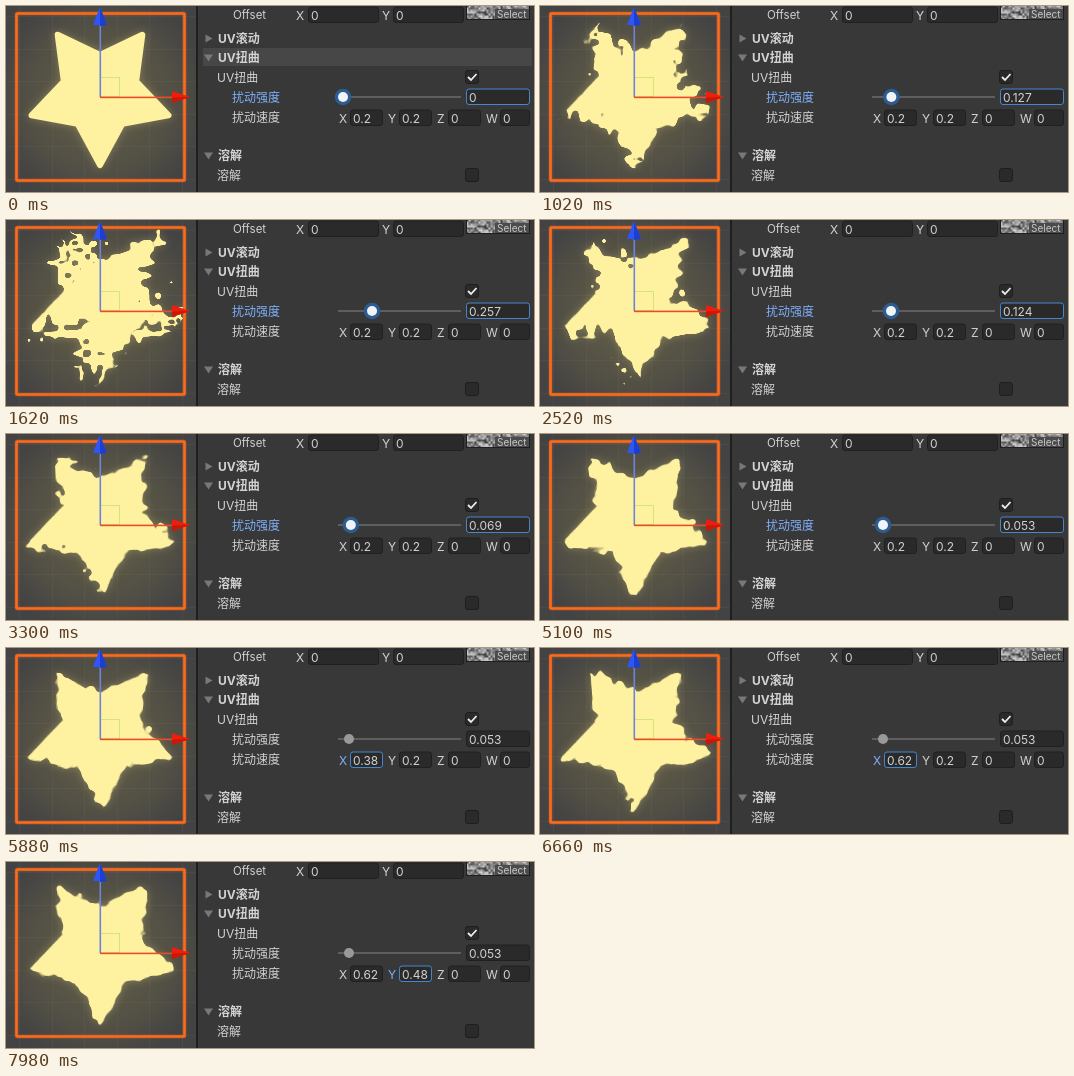
An HTML page with a canvas that plays this animation: 528x186 px, repeating every 8000 ms.

```html
<!DOCTYPE html>
<html lang="zh">
<head>
<meta charset="utf-8">
<style>
html, body { margin: 0; width: 100%; height: 100%; overflow: hidden; background: #383838; }
canvas { display: block; }
</style>
</head>
<body>
<canvas id="stage" width="528" height="186"></canvas>
<script>
const ctx = document.getElementById('stage').getContext('2d');
const LOOP = 8000, STEP = 60;
const SIZE = 166, LEFT = 11, TOP = 8;          // the textured quad
const FONT = 'Inter, "Noto Sans CJK SC", "Noto Sans CJK", sans-serif';
const TEXT = '#d2d2d2', BLUE = '#7fb0fb';

// Keyframes: [time, value, time, value, ...]
const STRENGTH = [540, 0, 900, .09, 1320, .22, 1560, .257, 1860, .257, 2220, .18, 2460, .124, 2580, .124, 3060, .085, 3540, .053];
const SPEED_X = [5580, .2, 6300, .62];
const SPEED_Y = [7260, .2, 7860, .48];

function track(keys, t) {
  if (t <= keys[0]) return keys[1];
  for (let i = 2; i < keys.length; i += 2) {
    if (t <= keys[i]) {
      const k = (t - keys[i - 2]) / (keys[i] - keys[i - 2]);
      return keys[i - 1] + (keys[i + 1] - keys[i - 1]) * k;
    }
  }
  return keys[keys.length - 1];
}

// Distance scrolled by the noise up to time t
function travel(keys, t) {
  let sum = 0;
  for (let s = 0; s < t; s += STEP) sum += track(keys, s) * STEP / 1000;
  return sum * SIZE;
}

let seed = 7;
const random = () => (seed = seed * 16807 % 2147483647) / 2147483647;
const lattice = Array.from({ length: 1024 }, random);

function valueNoise(x, y) {
  const ix = Math.floor(x), iy = Math.floor(y);
  let u = x - ix, v = y - iy;
  u *= u * (3 - 2 * u);
  v *= v * (3 - 2 * v);
  const at = (a, b) => lattice[(a & 31) + (b & 31) * 32];
  const a = at(ix, iy), b = at(ix + 1, iy), c = at(ix, iy + 1), d = at(ix + 1, iy + 1);
  return a + (b - a) * u + (c - a + (a - b - c + d) * u) * v;
}
const noise = (x, y) => .7 * valueNoise(x / 6.5, y / 6.5) + .3 * valueNoise(x / 13 + 9, y / 13 + 4);

function layer(w, h) {
  const c = document.createElement('canvas');
  c.width = w;
  c.height = h;
  return c.getContext('2d');
}

const star = layer(SIZE, SIZE);
star.beginPath();
for (let i = 0; i < 10; i++) {
  const r = i % 2 ? 38 : 72, a = Math.PI / 2 + i * Math.PI / 5;
  star.lineTo(94 - LEFT + r * Math.cos(a), 87 - TOP + r * Math.sin(a));
}
star.closePath();
star.lineWidth = 6;
star.lineJoin = 'round';
star.fill();
star.stroke();
const mask = star.getImageData(0, 0, SIZE, SIZE).data;
const warped = layer(SIZE, SIZE);
const pixels = warped.createImageData(SIZE, SIZE);

const alpha = (x, y) => x < 0 || y < 0 || x >= SIZE || y >= SIZE ? 0 : mask[(x + y * SIZE) * 4 + 3];

function sample(x, y) {
  const ix = Math.floor(x), iy = Math.floor(y), u = x - ix, v = y - iy;
  return (alpha(ix, iy) * (1 - u) + alpha(ix + 1, iy) * u) * (1 - v)
    + (alpha(ix, iy + 1) * (1 - u) + alpha(ix + 1, iy + 1) * u) * v;
}

// Noise pushes the lookup along the texture's diagonal
function warp(strength, t) {
  const dx = travel(SPEED_X, t), dy = travel(SPEED_Y, t), amp = strength * SIZE * 1.1;
  for (let y = 0, p = 0; y < SIZE; y++) {
    for (let x = 0; x < SIZE; x++, p += 4) {
      const d = amp ? amp * (noise(x + dx, y - dy) - .63) : 0;
      pixels.data[p] = 254;
      pixels.data[p + 1] = 242;
      pixels.data[p + 2] = 160;
      pixels.data[p + 3] = sample(x + d, y - d);
    }
  }
  warped.putImageData(pixels, 0, 0);
}

function rect(x, y, w, h, color) {
  ctx.fillStyle = color;
  ctx.fillRect(x, y, w, h);
}

function shape(color, ...pts) {
  ctx.fillStyle = color;
  ctx.beginPath();
  for (let i = 0; i < pts.length; i += 2) ctx.lineTo(pts[i], pts[i + 1]);
  ctx.fill();
}

function disc(x, y, r, color) {
  ctx.fillStyle = color;
  ctx.beginPath();
  ctx.arc(x, y, r, 0, 7);
  ctx.fill();
}

function label(s, x, y, color = TEXT, weight = 400, size = 12) {
  ctx.font = `${weight} ${size}px ${FONT}`;
  ctx.fillStyle = color;
  ctx.fillText(s, x, y);
}

function box(x, y, w, h, border = '#1e1e1e') {
  ctx.beginPath();
  ctx.roundRect(x + .5, y + .5, w - 1, h - 1, 2.5);
  ctx.fillStyle = '#2a2a2a';
  ctx.fill();
  ctx.lineWidth = 1;
  ctx.strokeStyle = border;
  ctx.stroke();
}

function field(value, x, y, w, focused) {
  box(x, y - .5, w, 16.5, focused ? '#4587cf' : '#202020');
  label(String(value), x + 3, y + 12.5);
}

function axis(name, value, x, fieldX, w, y, focused) {
  label(name, x, y + 12.5, focused ? BLUE : TEXT);
  field(value, fieldX, y, w, focused);
}

function drawScene(strength, t) {
  rect(0, 0, 190, 186, '#434343');
  ctx.fillStyle = 'rgba(255,255,255,.04)';
  for (let x = 13; x < 190; x += 32.5) ctx.fillRect(Math.round(x), 0, 1, 186);
  for (let y = 10; y < 186; y += 32.5) ctx.fillRect(0, Math.round(y), 190, 1);
  const glow = ctx.createRadialGradient(94, 92, 30, 94, 92, 110);
  glow.addColorStop(0, 'rgba(150,138,80,.34)');
  glow.addColorStop(.6, 'rgba(135,124,75,.2)');
  glow.addColorStop(1, 'rgba(120,110,70,0)');
  rect(0, 0, 190, 186, glow);

  warp(strength, t);
  ctx.save();
  ctx.shadowColor = 'rgba(255,235,140,.28)';
  ctx.shadowBlur = 8;
  ctx.drawImage(warped.canvas, LEFT, TOP);
  ctx.restore();

  for (const [width, color] of [[4, 'rgba(251,106,29,.35)'], [2.6, '#fb6a1d']]) {
    ctx.strokeStyle = color;
    ctx.lineWidth = width;
    ctx.beginPath();
    ctx.roundRect(10.5, 7.5, 168, 167, 1);
    ctx.stroke();
  }

  ctx.strokeStyle = 'rgba(180,222,95,.6)';
  ctx.lineWidth = 1;
  ctx.strokeRect(94.5, 71.5, 19, 19);
  rect(93.5, 18, 1.6, 73, '#6f83dc');
  rect(94, 90.6, 73, 1.6, '#ee4a28');
  shape('#2e55fa', 87, 19, 94, 1, 101, 19);
  shape('#1d3fd0', 94, 1, 101, 19, 94, 20);
  shape('#f01c0c', 166, 85, 184, 91, 166, 97);
  shape('#c81808', 166, 91.5, 184, 91, 166, 97);
}

const speckles = layer(62, 13);
for (let y = 0; y < 13; y++) {
  for (let x = 0; x < 62; x++) {
    const g = Math.round(60 + 150 * valueNoise(x / 2, y / 2));
    speckles.fillStyle = `rgb(${g},${g},${g})`;
    speckles.fillRect(x, y, 1, 1);
  }
}

function drawPanel(strength, t) {
  rect(190, 0, 338, 186, '#383838');
  rect(190, 0, 2, 186, '#1f1f1f');
  if (t < STEP) rect(197, 42, 329, 18, '#474747');

  label('Offset', 227, 13, TEXT, 400, 11.5);
  axis('X', 0, 290, 302, 71, 1);
  axis('Y', 0, 376, 387, 71, 1);
  rect(460, 0, 64, 14, '#1f1f1f');
  ctx.drawImage(speckles.canvas, 461, 0);
  rect(489, 3, 34, 10, '#4b4b4b');
  label('Select', 491, 12, '#c8c8c8', 400, 10);

  const arrow = '#787878';
  shape(arrow, 199.5, 28.5, 206.5, 32.5, 199.5, 36.5);
  shape(arrow, 198, 48.5, 207, 48.5, 202.5, 55.5);
  shape(arrow, 198, 146.5, 207, 146.5, 202.5, 153.5);
  label('UV滚动', 212, 37, TEXT, 700);
  label('UV扭曲', 212, 56, TEXT, 700);
  label('UV扭曲', 211, 76);
  label('溶解', 212, 154, TEXT, 700);
  label('溶解', 211, 174);

  box(459, 64, 14, 14);
  box(459, 162, 14, 14);
  ctx.strokeStyle = '#eee';
  ctx.lineWidth = 1.8;
  ctx.beginPath();
  ctx.moveTo(462, 71);
  ctx.lineTo(465, 74);
  ctx.lineTo(470.5, 68);
  ctx.stroke();

  const focus = t < 5220 ? 'strength' : t < 6840 ? 'x' : 'y';
  const sliding = focus === 'strength', knob = 337 + 113 * strength;
  label('扰动强度', 226, 96, sliding ? BLUE : TEXT);
  rect(332, 90, 123, 2, '#5e5e5e');
  if (sliding) {
    disc(knob, 91, 8.3, '#2c5d92');
    disc(knob, 91, 5, '#f0f4f8');
  } else {
    disc(knob, 91, 5, '#999');
  }
  field(+strength.toFixed(3), 460, 83, 64, sliding);

  label('扰动速度', 226, 116);
  axis('X', +track(SPEED_X, t).toFixed(2), 333, 344, 33, 104, focus === 'x');
  axis('Y', +track(SPEED_Y, t).toFixed(2), 382, 393, 33, 104, focus === 'y');
  axis('Z', 0, 431, 442, 33, 104);
  axis('W', 0, 480, 494, 30, 104);
}

let last = -1;
function tick(now) {
  const t = Math.floor(now % LOOP / STEP) * STEP;
  if (t !== last) {
    const strength = track(STRENGTH, t);
    drawScene(strength, t);
    drawPanel(strength, t);
    last = t;
  }
  requestAnimationFrame(tick);
}
tick(performance.now());
</script>
</body>
</html>
```
